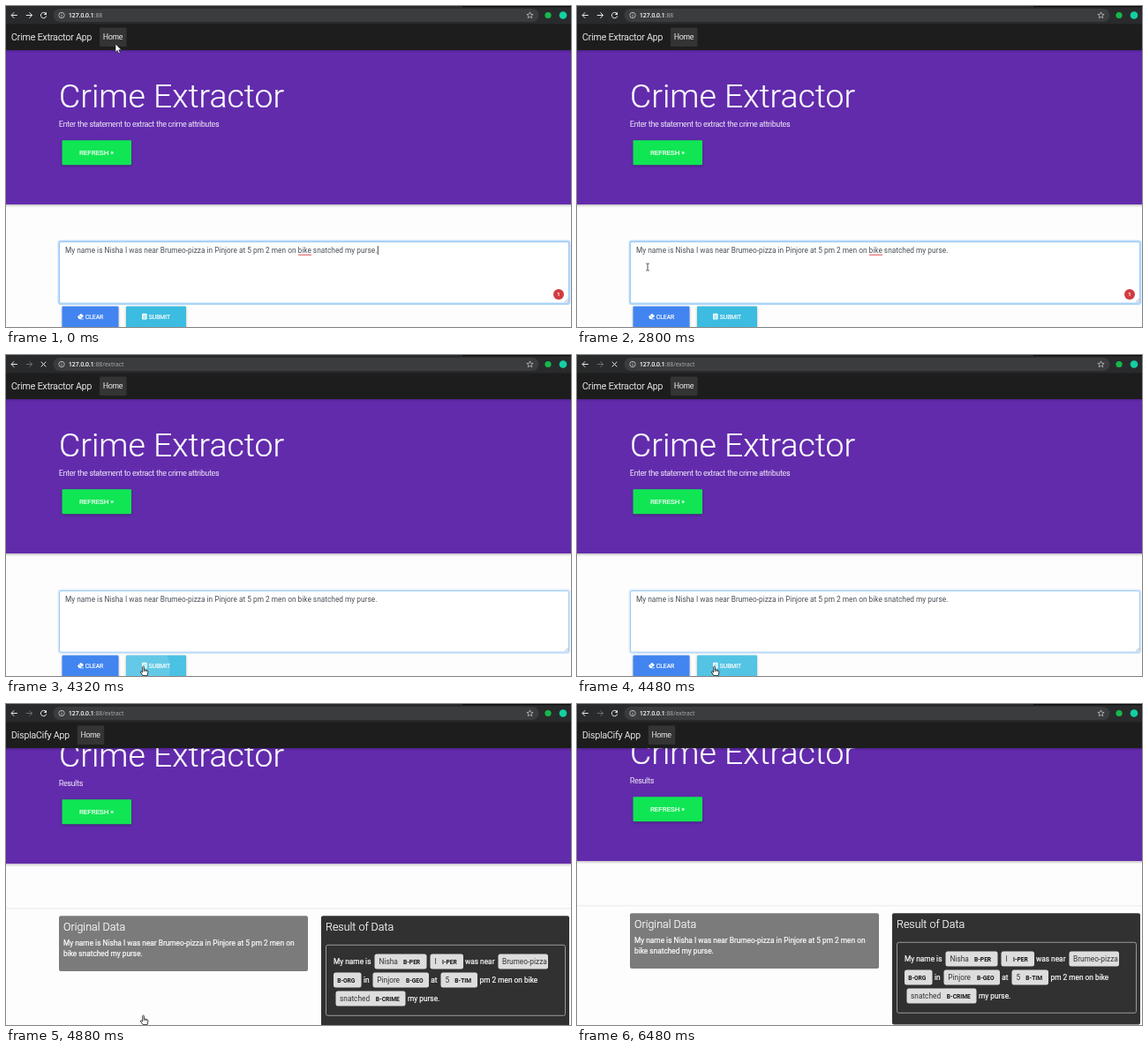
Animation, 640 px wide and 364 px high, one loop 6720 ms. Source, as an HTML page:

```html
<!DOCTYPE html>
<html lang="en">
<head>
<meta charset="utf-8">
<title>Crime Extractor</title>
<style>
html, body { margin: 0; width: 100%; height: 100%; overflow: hidden; background: #fdfdfd; }
svg { display: block; width: 100vw; height: 100vh; }
text { font-family: Roboto, sans-serif; white-space: pre; }
text[fill="#fff"] { stroke: #fff; stroke-width: .2; }
.url { font-family: "Noto Sans", "Open Sans", sans-serif; }
</style>
</head>
<body>
<svg id="stage" viewBox="0 0 640 364">
  <defs>
    <filter id="soft" x="-20%" y="-20%" width="140%" height="150%"><feGaussianBlur stdDeviation="1.5"/></filter>
    <clipPath id="submitClip"><rect x="136" y="340.5" width="68" height="28" rx="1"/></clipPath>
  </defs>
  <rect width="640" height="364" fill="#fdfdfd"/>
  <g id="form"></g>
  <g id="result"></g>
  <g id="nav"></g>
  <g id="bar"></g>
  <g id="arrow"><path d="M0 0V9.4L2.2 7.4L3.7 10.8L5.3 10.1L3.8 6.8H6.8Z" fill="#fff" stroke="#111" stroke-width=".6"/></g>
  <g id="beam"><path d="M-1.8 -4H-.5L0 -3.5L.5 -4H1.8M0 -3.5V3.5M-1.8 4H-.5L0 3.5L.5 4H1.8" fill="none" stroke="#222" stroke-width=".8"/></g>
  <g id="hand"><path d="M-.8 .6Q0 -.6 .8 .6V4L2 4.1L3.4 4.5L4.7 5Q5.6 5.3 5.4 6.5L4.6 10.6H-.4L-3.1 6.9Q-3.2 5.6 -1.9 6L-.8 7Z" fill="#fff" stroke="#111" stroke-width=".8"/><path d="M.8 4V6M2.3 4.4V6.2M3.8 4.8V6.4" stroke="#111" stroke-width=".6"/></g>
</svg>
<script>
const LOOP = 6720, STEP = 80;
const CLICK = 4160, NAVIGATE = 4240, LOADED = 4560;
const $ = id => document.getElementById(id);

const text = (x, y, size, str, fill = '#fff', weight = 400, extra = '') =>
  `<text x="${x}" y="${y}" font-size="${size}" fill="${fill}" font-weight="${weight}" ${extra}>${str}</text>`;
const rect = (x, y, w, h, fill, rx = 0, extra = '') =>
  `<rect x="${x}" y="${y}" width="${w}" height="${h}" fill="${fill}" rx="${rx}" ${extra}/>`;
const line = (d, stroke, width = 1, extra = '') =>
  `<path d="${d}" fill="none" stroke="${stroke}" stroke-width="${width}" ${extra}/>`;
const shadow = (x, y, w, h, opacity = .28) =>
  rect(x, y, w, h, '#000', 1, `opacity="${opacity}" filter="url(#soft)"`);
const button = (x, y, w, h, fill) => shadow(x, y + 1.2, w, h) + rect(x, y, w, h, fill, 1);

const BODY = 8.32;
const STORY = ['My name is Nisha I was near Brumeo-pizza in Pinjore at 5 pm 2 men on', 'bike snatched my purse.'];

function hero(subtitle, y, bottom) {
  return shadow(-5, 50, 650, bottom - 48.8) + rect(0, 50, 640, bottom - 50, '#622bac') +
    text(60, y - 22, 37.44, 'Crime Extractor', '#fff', 300) +
    text(60, y, BODY, subtitle, '#fff', 300) +
    button(63.5, y + 15.3, 78.5, 28, '#10e653') +
    text(83, y + 32, 7.9, 'REFRESH »');
}

$('form').innerHTML = hero('Enter the statement to extract the crime attributes', 137, 225) +
  rect(60, 267, 578, 70.5, 'none', 2, 'id="glow" stroke="#b9dafb" stroke-width="2.8"') +
  rect(60.5, 267.5, 577, 69.5, '#fff', 2, 'stroke="#8cc1f3" stroke-width=".8"') +
  text(67, 279.8, BODY, STORY.join(' '), '#495057') +
  line('M633 336L637 332M635.3 336L637 334.3', '#888', .6) +
  '<g id="checks">' + line('M331 282.2H346', '#e2464c', 1) +
  '<circle cx="626" cy="327" r="6" fill="#d13c40"/>' +
  text(626, 329.2, 6, '1', '#fff', 400, 'text-anchor="middle"') + '</g>' +
  rect(420.8, 272, .9, 10, '#333', 0, 'id="caret"') +
  button(63.5, 340.5, 64, 28, '#4285f0') +
  '<path d="M81 352.3L85 348.8L88 351.4L84.4 354.9H82.6Z" fill="#fff"/>' +
  line('M82.8 350.8L85.8 353.5', '#4285f0', .6) + line('M84 354.9H88', '#fff', .7) +
  text(89.8, 354.6, 6.74, 'CLEAR') +
  button(136, 340.5, 68, 28, '#3cbce0') +
  '<g clip-path="url(#submitClip)">' + rect(136, 340, 68, 28, '#fff', 0, 'id="hover" opacity=".08"') +
  '<circle id="ripple" cx="156" cy="355" fill="#fff"/></g>' +
  rect(154, 348.8, 5.6, 6.8, '#fff', .8) +
  line('M155.2 350.8H158.4M155.2 352.4H158.4M155.2 354H158.4', '#3cbce0', .6) +
  text(161.8, 354.6, 6.74, 'SUBMIT');

// An entity pill: [x, width, word, word x, label, label x]
function entity(mid, [x, w, word, wx, label, lx]) {
  return rect(x, mid - 8.5, w, 17, '#ddd', 2.5) +
    (word ? text(wx, mid + 3, BODY, word, '#333338') : '') +
    (label ? text(lx, mid + 2.7, 6.66, label, '#111', 700) : '');
}
const plain = (x, mid, str) => text(x, mid + 3, BODY, str);

$('result').innerHTML = hero('Results', 133, 221) +
  line('M0 271.8H640', '#e4e4e4', .8) +
  rect(60, 280.2, 282, 62.8, '#7b7b7b', 2) +
  text(65, 297.2, 12.48, 'Original Data', '#fff', 300) +
  text(65, 313.6, BODY, STORY[0]) + text(65, 326.2, BODY, STORY[1]) +
  rect(357, 280.2, 281, 126.3, '#313131', 2) +
  text(362, 297.2, 12.48, 'Result of Data', '#fff', 300) +
  rect(362.5, 313.3, 271, 80, 'none', 2, 'stroke="#b4b4b4" stroke-width=".8"') +
  plain(371, 332, 'My name is') +
  entity(332, [417.5, 59, 'Nisha', 422.5, 'B-PER', 450]) +
  entity(332, [480.5, 37.5, 'I', 485.5, 'I-PER', 494]) +
  plain(520, 332, 'was near') +
  entity(332, [557.5, 56.5, 'Brumeo-pizza', 562, '', 0]) +
  entity(353, [371, 31.5, '', 0, 'B-ORG', 375.2]) +
  plain(405, 353, 'in') +
  entity(353, [415.5, 63.5, 'Pinjore', 420.3, 'B-GEO', 453]) +
  plain(481.3, 353, 'at') +
  entity(353, [492.5, 41.5, '5', 497.4, 'B-TIM', 508.3]) +
  plain(536.5, 353, 'pm 2 men on bike') +
  entity(374, [373.5, 79, 'snatched', 378, 'B-CRIME', 418.8]) +
  plain(455, 374, 'my purse.');

const menu = (id, name, x) => `<g id="${id}">` + text(6, 38.7, 10.4, name, '#fff', 300) +
  rect(x, 24.5, 30.5, 21.5, '#343434', 1) + text(x + 4, 38, BODY, 'Home', '#fff', 300) + '</g>';
$('nav').innerHTML = shadow(-5, 20, 650, 30.6, .35) + rect(0, 20, 640, 30, '#1d1d1d') +
  menu('menuForm', 'Crime Extractor App', 106) + menu('menuResult', 'DisplaCify App', 80.7);

$('bar').innerHTML = rect(0, 0, 640, 20.5, '#292a2c') + rect(517, 0, 123, 1.2, '#0c0c0c') +
  rect(53.5, 3, 550, 15, '#3b3c3e', 7.5) +
  line('M12.8 10.5H6.2M9.2 7.3L6 10.5L9.2 13.7', '#e8eaed', 1) +
  line('M22.8 10.5H29.4M26.4 7.3L29.6 10.5L26.4 13.7', '#e8eaed', 1, 'id="forward"') +
  '<g id="reload">' + line('M45.1 8.6A3.2 3.2 0 1 0 45.7 11.3', '#e8eaed', 1) +
  '<path d="M46 6.8V10H42.8Z" fill="#e8eaed"/></g>' +
  line('M39.7 7.7L45.3 13.3M45.3 7.7L39.7 13.3', '#e8eaed', 1, 'id="stop"') +
  '<circle cx="63" cy="10.5" r="3.2" fill="none" stroke="#cfd2d6" stroke-width=".8"/>' +
  line('M63 10V12.4M63 8.5V9.2', '#cfd2d6', .8) +
  text(71, 13.2, 6.75, '127.0.0.1<tspan fill="#a6abb1" stroke="none">:88<tspan id="path"></tspan></tspan>', '#fff', 400, 'class="url"') +
  line('M593.5 6.9L594.5 9.3L597.1 9.5L595.1 11.2L595.7 13.7L593.5 12.3L591.3 13.7L591.9 11.2L589.9 9.5L592.5 9.3Z', '#d0d2d5', .7) +
  '<circle cx="614" cy="10.5" r="3.6" fill="#18b84a"/><circle cx="631" cy="10.5" r="4.3" fill="#14cfa3"/>';

const MOUSE = [[1600, 124, 43], [1840, 70, 278], [1920, 70, 278], [2080, 74, 290], [2400, 80, 296],
  [2800, 80, 296], [3440, 446, 298], [3600, 390, 302], [3920, 172, 347], [4080, 155.5, 353],
  [5920, 155.5, 353], [6080, 150, 374]];
const SCROLL = [[4800, 0], [4880, 40], [4960, 43]];

function along(keys, t) {
  if (t <= keys[0][0]) return keys[0].slice(1);
  for (let i = 1; i < keys.length; i++) {
    const [a, ...from] = keys[i - 1], [b, ...to] = keys[i];
    if (t <= b) return from.map((v, k) => v + (to[k] - v) * (t - a) / (b - a));
  }
  return keys[keys.length - 1].slice(1);
}

const show = (id, on) => $(id).setAttribute('display', on ? 'inline' : 'none');

function cursorAt(x, y, t) {
  if (t >= CLICK) return 'hand';
  if (x > 60 && x < 638 && y > 267 && y < 338) return 'beam';
  const overRefresh = x > 63 && x < 142 && y > 152 && y < 180;
  const overButtons = y > 340 && (x > 63 && x < 128 || x > 136 && x < 204);
  return overRefresh || overButtons ? 'hand' : 'arrow';
}

function draw(t) {
  const loaded = t >= LOADED, sent = t >= CLICK, away = t >= NAVIGATE;
  show('form', !loaded);
  show('result', loaded);
  show('menuForm', !loaded);
  show('menuResult', loaded);
  $('result').setAttribute('transform', `translate(0 ${-along(SCROLL, t)[0]})`);

  $('path').textContent = away ? '/extract' : '';
  $('forward').setAttribute('opacity', away ? .35 : 1);
  show('stop', away && !loaded);
  show('reload', !away || loaded);

  show('checks', !sent);
  show('caret', !sent && (t < 400 || (t + 480) % 560 < 320));
  $('glow').setAttribute('opacity', sent ? .5 : 1);

  const [x, y] = along(MOUSE, t), kind = cursorAt(x, y, t);
  for (const id of ['arrow', 'beam', 'hand']) show(id, id === kind);
  $(kind).setAttribute('transform', `translate(${x} ${y})`);
  show('hover', x > 136 && x < 204 && y > 340);

  const k = Math.min(1, Math.max(0, (t - CLICK) / 400));
  $('ripple').setAttribute('r', sent ? 10 + 50 * k : 0);
  $('ripple').setAttribute('opacity', .22 * (1 - k));
}

function tick() {
  draw(Math.floor(performance.now() % LOOP / STEP) * STEP);
  requestAnimationFrame(tick);
}
tick();
</script>
</body>
</html>
```
